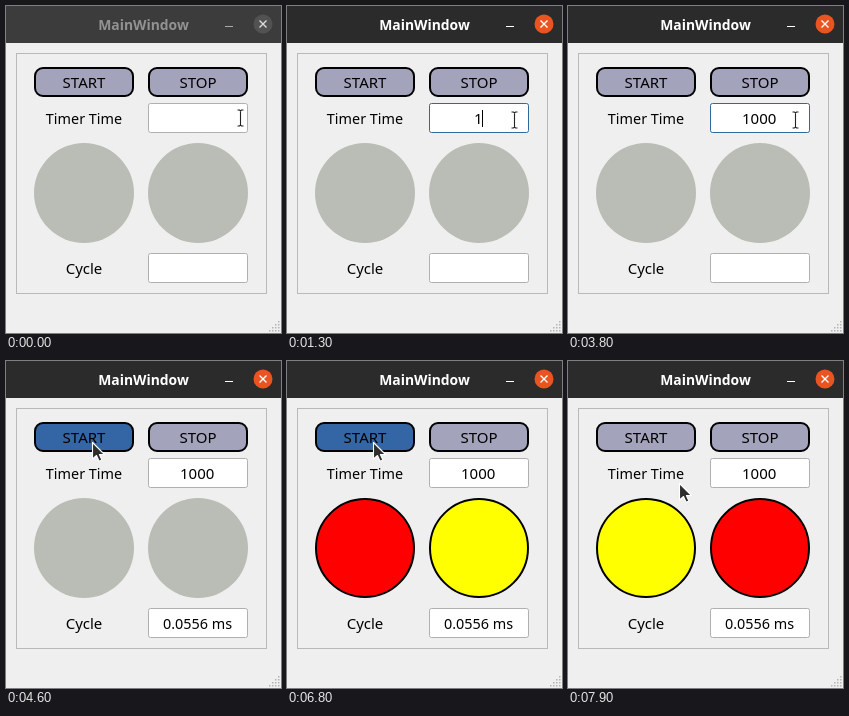
Animation, 275 px wide and 327 px high, one loop 8000 ms. Source, as an HTML page:

```html
<!DOCTYPE html>
<html lang="en">
<head>
<meta charset="utf-8">
<title>MainWindow</title>
<style>
  html, body { margin: 0; width: 100%; height: 100%; overflow: hidden; background: #efefef; }
  svg { display: block; }
  text { font: 15px "Noto Sans", "Open Sans", sans-serif; text-anchor: middle; fill: #000; }
  .small { font-size: 14.4px; }
  #title { font-size: 13.9px; font-weight: 700; }
  .button { stroke: #000; stroke-width: 2; }
  .input { fill: #fff; stroke: #b0b0b0; }
  .lamp { stroke-width: 2; }
</style>
</head>
<body>
<svg width="275" height="327" viewBox="0 0 275 327">
  <rect width="275" height="327" fill="#efefef"/>

  <rect id="bar" width="275" height="37"/>
  <text id="title" x="137.5" y="24">MainWindow</text>
  <path id="minimize" d="M219 20.5h8"/>
  <circle id="close" cx="257" cy="18" r="9.5"/>
  <path id="cross" d="M253.5 14.5l7 7m0-7l-7 7" stroke-width="1.4"/>

  <rect x="10.5" y="47.5" width="250" height="240" fill="none" stroke="#b9b9b9"/>

  <rect id="start" class="button" x="29" y="62" width="98" height="28" rx="8"/>
  <rect id="stop" class="button" x="143" y="62" width="98" height="28" rx="8"/>
  <text x="78" y="82">START</text>
  <text x="192" y="82">STOP</text>

  <text class="small" x="78" y="118">Timer Time</text>
  <rect id="field" class="input" x="142.5" y="97.5" width="99" height="29" rx="2"/>
  <text id="entry" x="191.2" y="118"></text>
  <rect id="caret" y="104" width="1" height="17"/>

  <circle id="left" class="lamp" cx="78" cy="187"/>
  <circle id="right" class="lamp" cx="192" cy="187"/>

  <text x="78" y="268">Cycle</text>
  <rect class="input" x="142.5" y="247.5" width="99" height="29" rx="2"/>
  <text id="cycle" class="small" x="191.5" y="268"></text>

  <g id="grip" fill="#b4b4b4"></g>

  <g id="beam" fill="none">
    <path d="M-3 -8h2l1 1 1-1h2M0 -7V7M-3 8h2l1-1 1 1h2" stroke="#fff" stroke-width="2.6"/>
    <path d="M-3 -8h2l1 1 1-1h2M0 -7V7M-3 8h2l1-1 1 1h2" stroke="#222" stroke-width="1.1"/>
  </g>
  <path id="arrow" d="M0 0V16.5L4 13L6.6 18.8L9.4 17.6L6.9 12H12Z"
        fill="#2d2d2d" stroke="#fff" stroke-width="1.1" stroke-linejoin="round"/>
</svg>
<script>
const LOOP = 8000;
const el = id => document.getElementById(id);
const set = (id, attrs) => {
  for (const name in attrs) el(id).setAttribute(name, attrs[name]);
};
const show = (id, on) => set(id, { visibility: on ? "visible" : "hidden" });

// Last row whose start time has passed.
const at = (rows, t) => rows.filter(row => row[0] <= t).pop();

const pointer = [
  [0, "beam", 234.5, 112], [300, "beam", 230.5, 119], [400, "beam", 227.5, 114],
  [4100, "beam", 216.5, 106], [4200, "arrow", 178, 82],
  [4300, "arrow", 112, 78], [4400, "arrow", 86.5, 81.5],
  [7800, "arrow", 98, 100], [7900, "arrow", 111.5, 122.5]
];
const typed = [[0, ""], [1300, "1"], [1900, "10"], [2100, "100"], [3100, "1000"]];
const caretOn = [[0, false], [400, true], [1000, false], [1300, true],
  [2800, false], [3100, true], [3800, false], [4400, true], [4600, false]];
const lamps = [
  [0, "#babdb6", "#babdb6"], [5800, "#ffff00", "#ff0000"],
  [6800, "#ff0000", "#ffff00"], [7800, "#ffff00", "#ff0000"]
];

for (let row = 0; row < 4; row++)
  for (let col = 0; col <= row; col++)
    el("grip").insertAdjacentHTML("beforeend",
      `<rect x="${272 - 3 * col}" y="${315 + 3 * row}" width="1.5" height="1.5"/>`);

function drawWindow(active) {
  set("bar", { fill: active ? "#2b2b2b" : "#3c3c3c" });
  set("title", { style: `fill:${active ? "#fff" : "#929292"}` });
  set("minimize", { stroke: active ? "#fff" : "#aaa" });
  set("close", { fill: active ? "#e95420" : "#525252" });
  set("cross", { stroke: active ? "#fff" : "#ddd" });
}

function drawPointer(t) {
  const [, kind, x, y] = at(pointer, t);
  for (const id of ["beam", "arrow"]) show(id, id === kind);
  set(kind, { transform: `translate(${x} ${y})` });
  const hover = (id, x0) => {
    const over = x >= x0 && x < x0 + 100 && y >= 61 && y < 91;
    set(id, { fill: over ? "#3465a4" : "#a3a3bb" });
  };
  hover("start", 28);
  hover("stop", 142);
}

function drawFields(t) {
  const value = at(typed, t)[1];
  const focused = t >= 400 && t < 4600;
  el("entry").textContent = value;
  set("field", { style: `stroke:${focused ? "#306a9c" : "#b0b0b0"}` });
  set("caret", { x: 191 + Math.round(value.length * 4.25) });
  show("caret", at(caretOn, t)[1]);
  el("cycle").textContent = t < 4600 ? "" : "0.0556 ms";
}

function drawLamps(t) {
  const [start, left, right] = at(lamps, t);
  const outline = start ? { r: 49, stroke: "#000" } : { r: 50, stroke: "none" };
  set("left", { ...outline, fill: left });
  set("right", { ...outline, fill: right });
}

function draw(now) {
  const t = now % LOOP;
  drawWindow(t >= 400);
  drawPointer(t);
  drawFields(t);
  drawLamps(t);
}

function frame() {
  draw(performance.now());
  requestAnimationFrame(frame);
}
frame();
</script>
</body>
</html>
```
